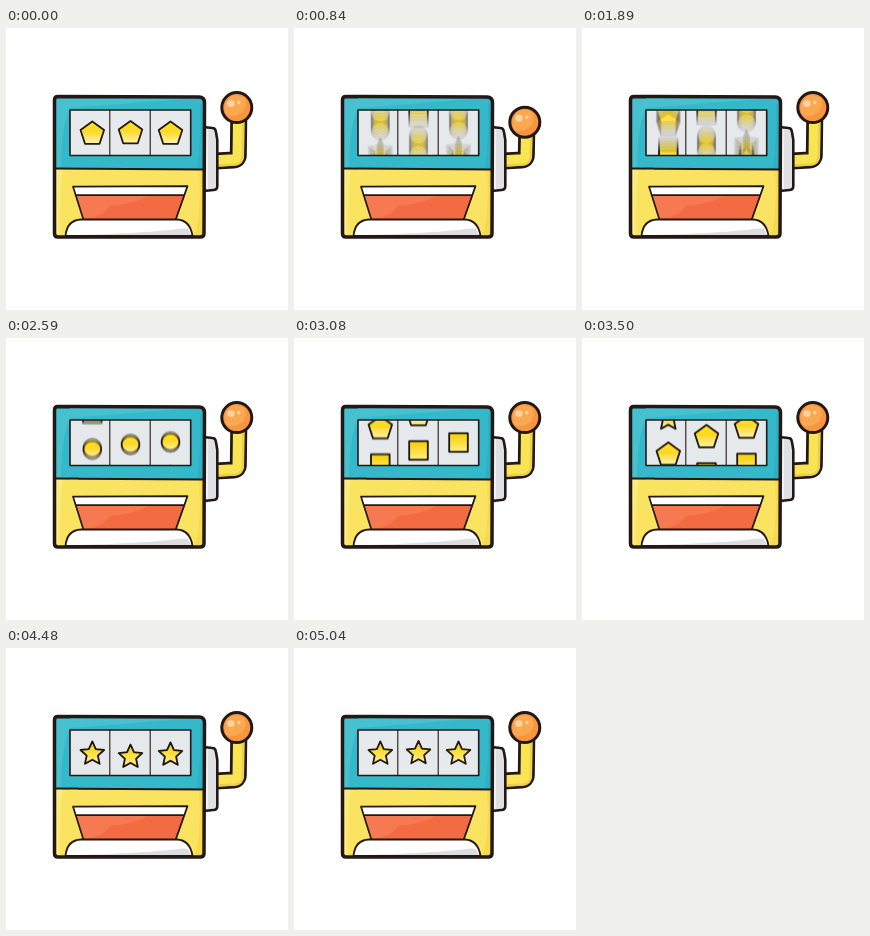
Animation of 282 by 282 pixels, one loop 6300 ms. Source, as an HTML page:

```html
<!DOCTYPE html>
<html lang="en">
<head>
<meta charset="utf-8">
<title>Slot machine</title>
<style>
html, body { margin: 0; width: 100%; height: 100%; overflow: hidden; background: #fff; }
svg { display: block; width: 100%; height: 100%; }
.ink { stroke: #231815; stroke-linejoin: round; stroke-linecap: round; }
</style>
</head>
<body>
<svg viewBox="0 0 282 282">
  <defs>
    <clipPath id="window"><path d="M64.5 82.5H184.5V127H64.5Z"/></clipPath>
    <clipPath id="body"><path d="M52 69H193Q199 69 199 75L198 205Q198 208 195 208H52Q49 208 49 205V72Q49 69 52 69Z"/></clipPath>
    <linearGradient id="gold" x1="0" y1="0" x2="0" y2="1">
      <stop offset=".1" stop-color="#ffe21f"/>
      <stop offset=".45" stop-color="#fbd92c"/>
      <stop offset="1" stop-color="#fff3ae"/>
    </linearGradient>
    <linearGradient id="gold2" x1="0" y1="0" x2="0" y2="1">
      <stop offset=".2" stop-color="#f8d51c"/>
      <stop offset="1" stop-color="#fff08a"/>
    </linearGradient>
  </defs>

  <!-- lever -->
  <path id="armInk" class="ink" fill="none" stroke-width="17" style="stroke-linecap:butt"/>
  <path id="armFill" fill="none" stroke="#f9e553" stroke-width="11.5" stroke-linejoin="round"/>
  <path id="armShade" fill="none" stroke="#ecd04a" stroke-width="2.5" stroke-linejoin="round"/>
  <path class="ink" fill="#e0e1e5" stroke-width="2.6" d="M197.500 99L206.500 100Q209.500 100 210 104L211.300 112V158Q211.300 162 207.500 162L197.500 163Z"/>
  <path fill="#f1f2f4" d="M199 101H202V161H199Z"/>
  <g id="ball">
    <circle class="ink" r="15" fill="#f8963f" stroke-width="3"/>
    <path fill="#fba850" d="M-12 2A12 12 0 0 1 8 -9Q11 -2 5 5Q-3 10 -9 8Q-12 6 -12 2Z"/>
    <ellipse cx="-6" cy="-4" rx="3.800" ry="3.400" fill="#fdd3a0"/>
    <circle cx="2" cy="-5" r="1.800" fill="#fdd3a0"/>
  </g>

  <!-- cabinet -->
  <g clip-path="url(#body)">
    <path fill="#fae360" d="M48 138H200V210H48Z"/>
    <path fill="#fbea80" d="M49 141H57Q53 160 54 208H49Z"/>
    <path fill="#f5d94f" d="M199 142V208H188Q196 190 193 142Z"/>
    <path fill="#34b8ca" d="M48 67H200V141.300L48 140.500Z"/>
    <path fill="#47c0cf" d="M49 70H188Q130 75 64 80Q55 100 55 140H49Z"/>
    <path fill="#2eb0c3" d="M199 76V142H191Q195 110 194 76Z"/>
  </g>
  <path class="ink" fill="none" stroke-width="2" d="M49 140.500L198 141.400"/>
  <path class="ink" fill="none" stroke-width="3.500" d="M52 68.500L193 69Q198.500 69 198.500 75L198 205.500Q198 209 194 209H52Q48.500 209 48.500 205.500V72Q48.500 68.500 52 68.500Z"/>

  <!-- payout tray -->
  <g transform="translate(0 .6)">
    <path fill="#fff" d="M67 158L181.500 157.500L169 193H78Z"/>
    <path fill="#f36b42" d="M70 167L179 167L169 193H78Z"/>
    <path fill="#f67a51" d="M70 167H142Q128 176 104 177Q96 190 77 190Z"/>
    <path class="ink" fill="none" stroke-width="1.700" d="M69.500 166.500H178.500M67 158L181.500 157.500L169 193H78Z"/>
  </g>
  <path class="ink" fill="#fff" stroke-width="1.800" d="M59.500 208Q61 192 75 191.500H171Q184 192 186.500 208Z"/>
  <path fill="#dcdde1" d="M72 207Q130 205.500 164 202Q177 199.500 182 201L185 207Z"/>

  <!-- reels -->
  <path fill="#e7eaed" d="M64 82H185V127.500H64Z"/>
  <g id="reels" clip-path="url(#window)"></g>
  <path class="ink" fill="none" stroke-width="1.100" d="M103.800 82V127M144.200 82V127"/>
  <path class="ink" fill="none" stroke-width="1.600" d="M64 82H184.700V127.500H64Z"/>
</svg>
<script>
const LOOP = 6300, STEP = 70, END = 5040;
const GAP = 36, COUNT = 4, SPAN = GAP * COUNT, MID = 105;
const SHUTTER = 32, SAMPLES = 14;
const NS = 'http://www.w3.org/2000/svg';
const $ = id => document.getElementById(id);

function add(parent, tag, attrs) {
  const el = document.createElementNS(NS, tag);
  for (const k in attrs) el.setAttribute(k, attrs[k]);
  return parent.appendChild(el);
}

// closed ring of n points; alternating radii make a star
function ring(n, radii, cy) {
  let d = '';
  for (let i = 0; i < n; i++) {
    const a = i * 2 * Math.PI / n - Math.PI / 2, r = radii[i % radii.length];
    d += (i ? 'L' : 'M') + (r * Math.cos(a)).toFixed(2) + ' ' + (cy + r * Math.sin(a)).toFixed(2);
  }
  return d + 'Z';
}

// symbols in the order they sit on the strip, downwards
const SHAPES = [
  { d: ring(10, [12.4, 5.9], 0.8), fill: 'url(#gold2)' },
  { d: ring(5, [12.4], 0.8), fill: 'url(#gold)' },
  { d: 'M-9.3 -9.3H9.3V9.3H-9.3Z', fill: 'url(#gold2)' },
  { d: 'M-9 0A9 9 0 1 1 9 0A9 9 0 1 1 -9 0Z', fill: 'url(#gold)' }
];

// keys: [time, distance left to the final stop]
const REELS = [
  { x: 86.3, y: 0, cell: [64, 104], keys: [[70, 1620], [840, 1271], [1890, 339], [2590, 102], [3500, 25], [4150, -3], [4480, 0]] },
  { x: 124.5, y: -0.5, cell: [104, 144], keys: [[70, 1764], [840, 1392], [1890, 385], [2590, 106], [3500, 42], [4550, -4], [4850, 0]] },
  { x: 164.5, y: 0, cell: [144, 185], keys: [[70, 1764], [840, 1416], [1890, 415], [2590, 109], [3500, 52], [4480, -1], [4700, -4], [END, 0]] }
];

// monotone cubic through the keys
function curve(keys) {
  const n = keys.length - 1;
  const h = [], s = [];
  for (let i = 0; i < n; i++) {
    h[i] = keys[i + 1][0] - keys[i][0];
    s[i] = (keys[i + 1][1] - keys[i][1]) / h[i];
  }
  const m = keys.map((k, i) => {
    if (i === 0 || i === n || s[i - 1] * s[i] <= 0) return 0;
    const a = 2 * h[i] + h[i - 1], b = h[i] + 2 * h[i - 1];
    return (a + b) / (a / s[i - 1] + b / s[i]);
  });
  return t => {
    if (t <= keys[0][0]) return keys[0][1];
    if (t >= keys[n][0]) return keys[n][1];
    let i = 0;
    while (t >= keys[i + 1][0]) i++;
    const u = (t - keys[i][0]) / h[i], v = 1 - u;
    return keys[i][1] * (1 + 2 * u) * v * v + keys[i + 1][1] * u * u * (3 - 2 * u)
      + h[i] * u * v * (m[i] * v - m[i + 1] * u);
  };
}

// each reel is a stack of layers whose opacities average to an open-shutter blur
for (const reel of REELS) {
  const [x0, x1] = reel.cell;
  reel.left = curve(reel.keys);
  reel.layers = Array.from({ length: SAMPLES }, (_, k) => {
    const layer = add($('reels'), 'g', { opacity: 1 / (k + 1) });
    add(layer, 'path', { d: `M${x0} 82H${x1}V128H${x0}Z`, fill: '#e7eaed' });
    const items = SHAPES.map(s => add(layer, 'path', {
      d: s.d, fill: s.fill, class: 'ink', 'stroke-width': 1.8
    }));
    return { layer, items };
  });
}

const wave = u => (1 - Math.cos(Math.PI * Math.min(1, Math.max(0, u)))) / 2;
const mod = (a, n) => ((a % n) + n) % n;

function drawLever(t) {
  const y = 79.6 + 46 * (t < 500 ? wave(t / 500) : 1 - wave((t - 500) / 550));
  $('ball').setAttribute('transform', `translate(230.8 ${y.toFixed(2)})`);
  const top = Math.min(y + 8, 122);
  const arm = `M232.800 ${top}L232.300 127Q232.300 131.500 227.500 132L210 133`;
  $('armInk').setAttribute('d', arm);
  $('armFill').setAttribute('d', arm);
  $('armShade').setAttribute('d', `M237.300 ${top}L236.800 129Q236.300 135.500 229.500 136.500L211 137.500`);
}

function drawReel(reel, t) {
  const moving = reel.left(t - SHUTTER / 2) !== reel.left(t + SHUTTER / 2);
  reel.layers.forEach(({ layer, items }, n) => {
    layer.setAttribute('display', moving || n === 0 ? 'inline' : 'none');
    const left = reel.left(moving ? t + SHUTTER * ((n + 0.5) / SAMPLES - 0.5) : t);
    items.forEach((el, k) => {
      const off = mod(k * GAP - left + SPAN / 2, SPAN) - SPAN / 2;
      el.setAttribute('transform', `translate(${reel.x} ${(MID + reel.y + off).toFixed(2)})`);
    });
  });
}

function draw(ms) {
  let t = Math.floor((ms % LOOP) / STEP) * STEP;
  if (t >= END) t = END + SHUTTER;
  drawLever(t);
  for (const reel of REELS) drawReel(reel, t);
}

const start = performance.now();
function tick() {
  draw(performance.now() - start);
  requestAnimationFrame(tick);
}
tick();
</script>
</body>
</html>
```
